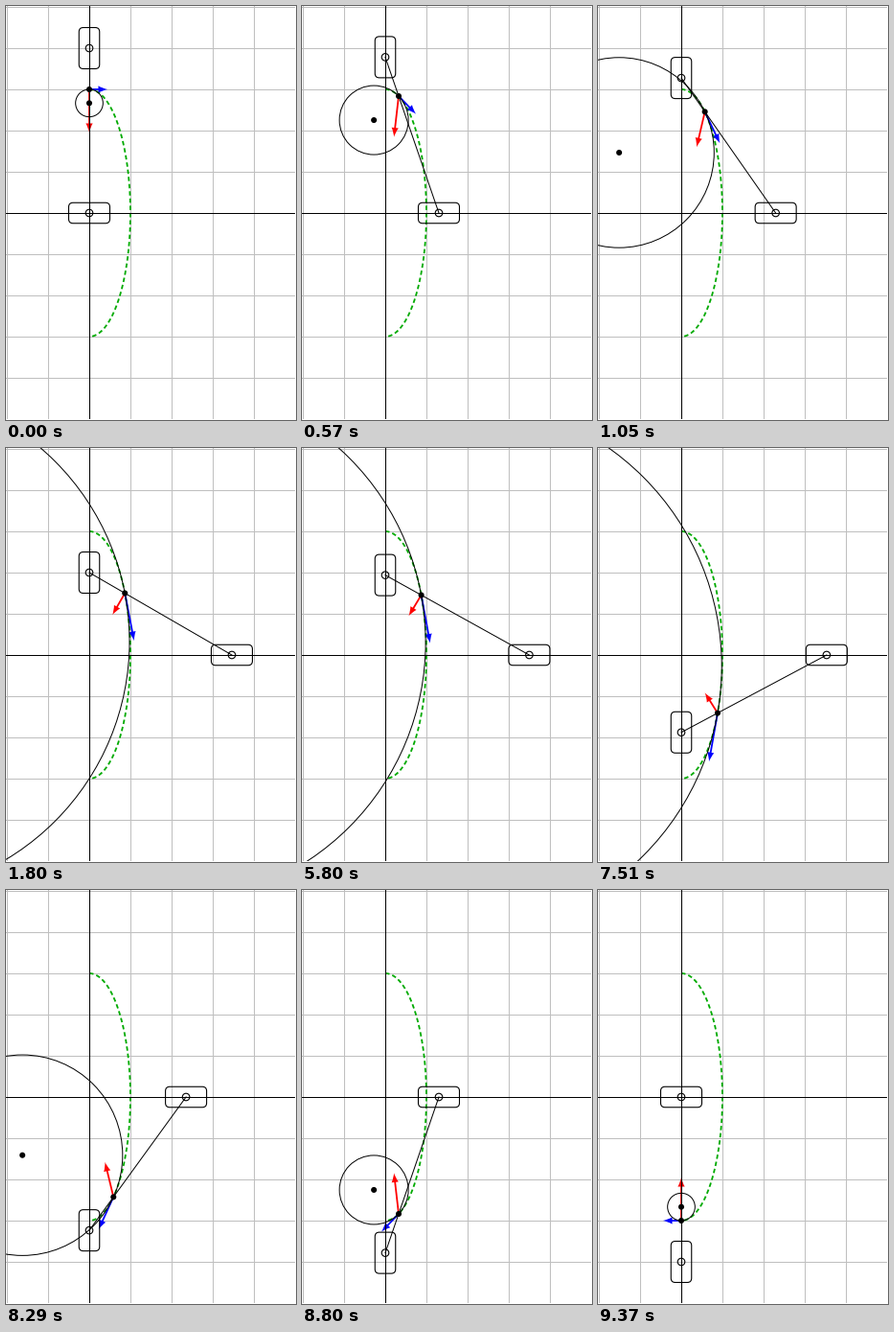
Recreate the animation shown at these times as a matplotlib script. Size 303 by 432 pixels, loop 9400 ms.

```python
import numpy as np
import matplotlib.pyplot as plt
from matplotlib.animation import FuncAnimation
from matplotlib.collections import LineCollection
from matplotlib.patches import Circle, FancyBboxPatch, PathPatch
from matplotlib.path import Path

W, H, DPI = 303, 432, 72        # at 72 dpi one point is one pixel
UNIT = 43
OX, OY = 87, 216
A, B, ROD = UNIT, 3 * UNIT, 4 * UNIT
PT = UNIT / 28.45               # typographic point in pixels

TICK = 20                       # ms per animation frame
STEP = 30                       # ms per degree
PAUSE_AT, PAUSE = 60, 4000      # hold angle and its length in ms
LOOP = 180 * STEP + PAUSE

fig = plt.figure(figsize=(W / DPI, H / DPI), dpi=DPI, facecolor="white")
ax = fig.add_axes([0, 1 / H, (W - 1) / W, (H - 1) / H])
ax.set_xlim(0, W - 1)
ax.set_ylim(H - 1, 0)
ax.axis("off")


def segments(lines, color, z):
    ax.add_collection(LineCollection(lines, colors=color, linewidths=1,
                                     antialiaseds=False, zorder=z), autolim=False)


def vline(x):
    return [(x + 0.5, 0), (x + 0.5, H - 1)]


def hline(y):
    return [(0, y + 0.5), (W - 1, y + 0.5)]


segments([vline(i * UNIT) for i in range(8)]
         + [hline(i * UNIT) for i in range(11)], "#bfbfbf", 1)
segments([vline(2 * UNIT), hline(5 * UNIT)], "black", 4)

t = np.linspace(0, np.pi, 400)
green_w = 1.2 * PT
ax.plot(OX + A * np.sin(t), OY - B * np.cos(t), color="#00aa00", lw=green_w,
        dashes=(3 * PT / green_w, 2 * PT / green_w), dash_capstyle="butt", zorder=2)


def add(patch, z):
    patch.set_zorder(z)
    return ax.add_patch(patch)


def ring(r, lw, z):
    return add(Circle((0, 0), r, fill=False, ec="black", lw=lw), z)


def dot():
    return add(Circle((0, 0), 2 * PT, fc="black", ec="none"), 8)


def slider(w, h):
    style = f"round,pad=0,rounding_size={3 * PT}"
    return add(FancyBboxPatch((0, 0), w, h, boxstyle=style, fill=False,
                              ec="black", lw=1.1), 6)


ARROW_CODES = ([Path.MOVETO] + [Path.LINETO] * 2 + [Path.CURVE4] * 6
               + [Path.LINETO] * 2 + [Path.CLOSEPOLY])


def arrow_path(start, vec):
    """Shaft with a slim, concave head whose tip lies at start + vec."""
    length = np.hypot(*vec)
    u = vec / length
    n = np.array([-u[1], u[0]])
    s = 0.64 * PT
    w = 0.6 * PT
    base = length - 10 * s
    upper = [(0, w), (base, w), (base, 3.75 * s),
             (base + 3 * s, 2 * s), (base + 7.333 * s, 0.5 * s)]
    lower = [(x, -y) for x, y in reversed(upper)]
    pts = upper + [(length, 0)] + lower + [upper[0]]
    return Path([start + x * u + y * n for x, y in pts], ARROW_CODES)


def arrow(color):
    origin = np.array([OX, OY])
    return add(PathPatch(arrow_path(origin, np.array([20.0, 0.0])),
                         fc=color, ec="none"), 3)


accel, veloc = arrow("red"), arrow("blue")
curvature = ring(1, 1, 5)
box_y, box_x = slider(UNIT / 2, UNIT), slider(UNIT, UNIT / 2)
pin_y, pin_x = ring(2.5 * PT, 1.1, 7), ring(2.5 * PT, 1.1, 7)
rod, = ax.plot([], [], color="black", lw=1, zorder=7)
pen, center = dot(), dot()


def angle(ms):
    hold = PAUSE_AT * STEP
    if ms >= hold:
        ms = max(hold, ms - PAUSE + STEP)
    return ms // STEP


def place(box, pin, x, y):
    box.set_x(x - box.get_width() / 2)
    box.set_y(y - box.get_height() / 2)
    pin.center = x, y


def update(i):
    th = np.radians(angle(i * TICK + TICK // 2))
    s, c = np.sin(th), np.cos(th)
    p = np.array([OX + A * s, OY - B * c])
    v = np.array([A * c, B * s])
    a = np.array([-A * s, B * c])

    place(box_y, pin_y, OX, OY - ROD * c)
    place(box_x, pin_x, OX + ROD * s, OY)
    rod.set_data([OX, OX + ROD * s], [OY - ROD * c, OY])
    veloc.set_path(arrow_path(p, 0.445 * v))
    accel.set_path(arrow_path(p, 0.35 * a))

    k = B * B - A * A
    mid = OX - k / A * s ** 3, OY - k / B * c ** 3
    curvature.center = mid
    curvature.set_radius(np.hypot(*v) ** 3 / (A * B))
    center.center = mid
    pen.center = p
    return accel, veloc, curvature, box_y, box_x, pin_y, pin_x, rod, pen, center


anim = FuncAnimation(fig, update, frames=LOOP // TICK, interval=TICK,
                     init_func=lambda: update(0), repeat=True, repeat_delay=0,
                     blit=False)
plt.show()
```
